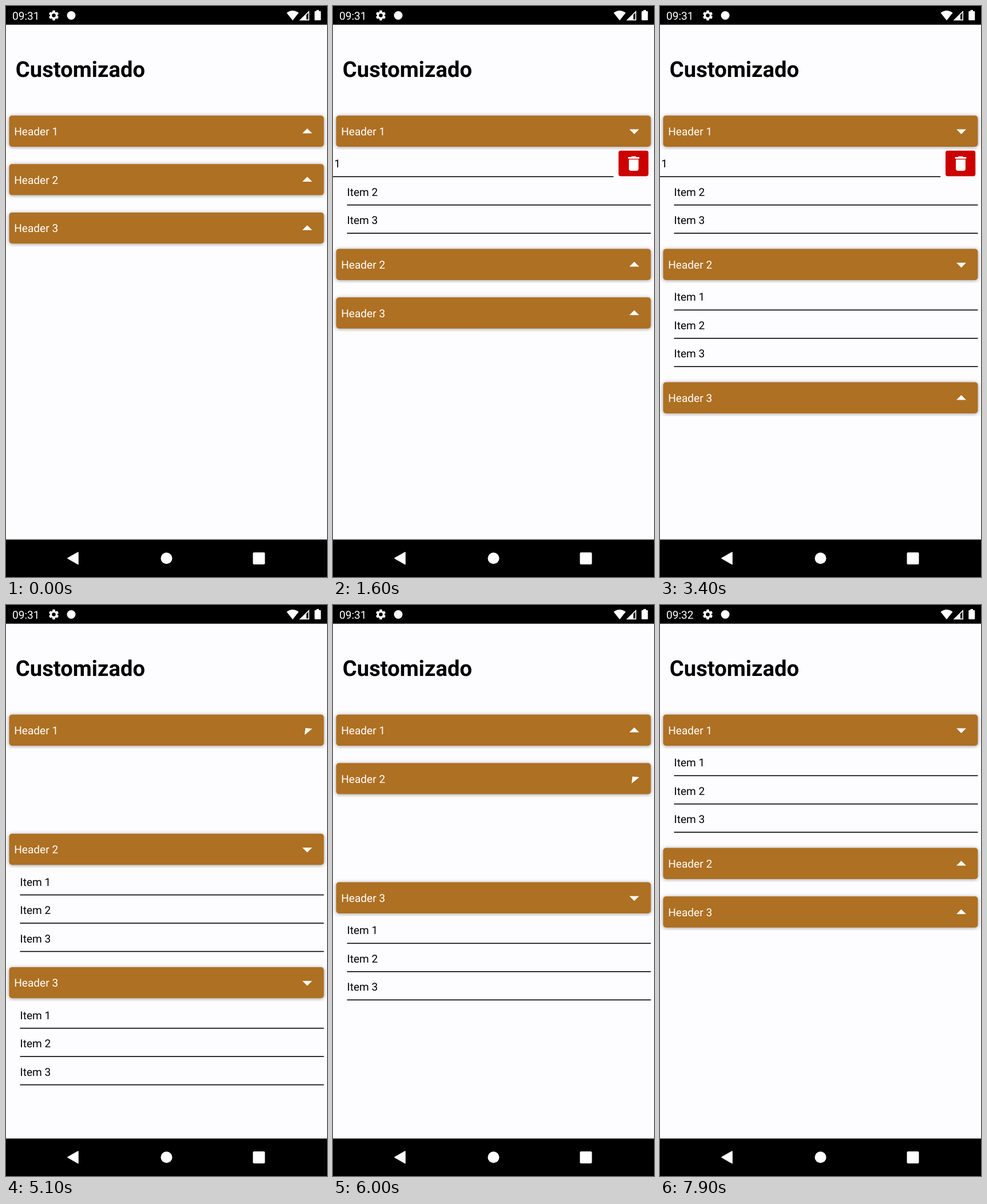
Recreate the animation shown at these times as an HTML page. Size 561 by 998 pixels, loop 8000 ms.

```html
<!DOCTYPE html>
<html lang="pt">
<head>
<meta charset="utf-8">
<title>Customizado</title>
<style>
  html, body { margin: 0; width: 100%; height: 100%; overflow: hidden; background: #fdfcff; }
  svg { display: block; width: 561px; height: 998px; font: 19.1px Roboto, sans-serif; text-rendering: geometricPrecision; }
  .title { font-size: 38.2px; font-weight: 700; }
  .bar { fill: #ae7022; filter: drop-shadow(0 1.5px 3.5px rgba(0, 0, 0, .36)); }
  .row { fill: #fdfcff; }
  .white { fill: #fff; }
</style>
</head>
<body>
<svg viewBox="0 0 561 998">
  <defs>
    <clipPath id="shade"><rect y="-10" width="561" height="69.5"/></clipPath>
  </defs>
  <rect width="561" height="998" fill="#fdfcff"/>
  <text class="title" x="16.8" y="123.7">Customizado</text>
  <g id="list"></g>

  <g class="white">
    <rect width="561" height="32.7" fill="#000"/>
    <text id="clock" x="11" y="23.8">09:31</text>
    <path transform="translate(72.7 5.7) scale(.9)" d="M19.14 12.94c.04-.3.06-.61.06-.94s-.02-.64-.07-.94l2.03-1.58c.18-.14.23-.41.12-.61l-1.92-3.32c-.12-.22-.37-.29-.59-.22l-2.39.96c-.5-.38-1.03-.7-1.62-.94l-.36-2.54c-.04-.24-.24-.41-.48-.41h-3.84c-.24 0-.43.17-.47.41l-.36 2.54c-.59.24-1.13.57-1.62.94l-2.39-.96c-.22-.08-.47 0-.59.22L2.74 8.87c-.12.21-.08.47.12.61l2.03 1.58c-.05.3-.09.63-.09.94s.02.64.07.94l-2.03 1.58c-.18.14-.23.41-.12.61l1.92 3.32c.12.22.37.29.59.22l2.39-.96c.5.38 1.03.7 1.62.94l.36 2.54c.05.24.24.41.48.41h3.84c.24 0 .44-.17.47-.41l.36-2.54c.59-.24 1.13-.56 1.62-.94l2.39.96c.22.08.47 0 .59-.22l1.92-3.32c.12-.22.07-.47-.12-.61zM12 15.6a3.6 3.6 0 1 1 0-7.2 3.6 3.6 0 0 1 0 7.2z"/>
    <circle cx="114" cy="16.5" r="7.5"/>
    <path d="M501 25.3 490.5 11.9Q501 4 511.5 11.9Z"/>
    <path d="M512.5 25.3 530 8V25.3ZM525 15.3V23.6H528.4V12Z" fill-rule="evenodd"/>
    <path d="M542.5 7h4.5v2h2q1.3 0 1.3 1.3v13.4q0 1.3-1.3 1.3h-8.4q-1.3 0-1.3-1.3V10.3q0-1.3 1.3-1.3h1.9Z"/>

    <rect y="932.5" width="561" height="66" fill="#000"/>
    <path d="M108 965.3 126 955V975.6Z" stroke="#fff" stroke-width="1.6" stroke-linejoin="round"/>
    <circle cx="280.5" cy="965.3" r="10"/>
    <rect x="431.5" y="955" width="21" height="21" rx="2"/>
  </g>
</svg>
<script>
const LOOP = 8000, TOP = 191.5, PITCH = 84.7, ROW = 49.45, BODY = 3 * ROW;
const ARROW_MS = 300, LAYOUT_MS = 400, LAYOUT_DELAY = 101;
const SWIPE = { from: 1250, to: 1580, reset: 4893, dist: 65.3 };
const CLOCK_TICK = 7300;
// [time, section, opens]
const TAPS = [
  [800, 0, 1], [1960, 1, 1], [3393, 2, 1],
  [4893, 0, 0], [5793, 1, 0], [6270, 2, 0], [7120, 0, 1]
];

const list = document.getElementById('list');
const clock = document.getElementById('clock');

const itemRow = (n, i) => {
  const y = 59.5 + i * ROW;
  return `<g class="item">
    <rect class="row" x="24" y="${y}" width="531" height="48"/>
    <text x="24.5" y="${y + 31.3}">Item ${n}</text>
    <rect x="24.5" y="${y + 46.5}" width="531" height="1.6"/></g>`;
};

const bin = `<g class="bin"><rect x="499" y="61.3" width="52.3" height="44.6" rx="4" fill="#c00"/>
  <path class="white" transform="translate(508.7 67) scale(1.4)"
    d="M6 19c0 1.1.9 2 2 2h8c1.1 0 2-.9 2-2V7H6v12zM19 4h-3.5l-1-1h-5l-1 1H5v2h14V4z"/></g>`;

const sections = [0, 1, 2].map(i => {
  list.insertAdjacentHTML('beforeend', `<g>
    <clipPath id="body${i}"><rect y="59.5" width="561" height="0"/></clipPath>
    <g class="items" clip-path="url(#body${i})">${i ? '' : bin}${[1, 2, 3].map(itemRow).join('')}</g>
    <g clip-path="url(#shade)"><rect class="bar" x="5.5" width="550" height="54.4" rx="5"/></g>
    <text class="white" x="14.2" y="34.5">Header ${i + 1}</text>
    <path class="arrow white" d="M-8.5 3.4H8.5L0-5.1Z"/></g>`);
  const el = list.lastElementChild, pick = s => el.querySelector(s);
  return { el, items: pick('.items'), clip: pick('clipPath rect'), arrow: pick('.arrow') };
});
const swiped = list.querySelector('.item'), binEl = list.querySelector('.bin');

const ease = (t, start, ms) => {
  const k = Math.min(1, Math.max(0, (t - start) / ms));
  return (1 - Math.cos(Math.PI * k)) / 2;
};

function state(t, section) {
  const s = { turn: 0, open: 0, shown: false };
  for (const [at, id, opens] of TAPS) {
    if (id !== section || t < at) continue;
    const side = k => opens ? k : 1 - k;
    s.turn = side(ease(t, at, ARROW_MS));
    s.open = side(ease(t, at + LAYOUT_DELAY, LAYOUT_MS));
    s.shown = !!opens;
  }
  return s;
}

function draw(t) {
  let y = TOP;
  sections.forEach((sec, i) => {
    const { turn, open, shown } = state(t, i);
    sec.el.setAttribute('transform', `translate(0 ${y})`);
    sec.arrow.setAttribute('transform', `translate(526.5 27.5) rotate(${-180 * turn})`);
    sec.items.setAttribute('opacity', shown ? open : 0);
    sec.clip.setAttribute('height', BODY * open);
    y += PITCH + BODY * open;
  });
  const pull = t < SWIPE.reset ? ease(t, SWIPE.from, SWIPE.to - SWIPE.from) : 0;
  swiped.setAttribute('transform', `translate(${-SWIPE.dist * pull} 0)`);
  binEl.setAttribute('visibility', pull ? 'visible' : 'hidden');
  clock.textContent = t < CLOCK_TICK ? '09:31' : '09:32';
}

const start = performance.now();
function tick() {
  draw((performance.now() - start) % LOOP);
  requestAnimationFrame(tick);
}
tick();
</script>
</body>
</html>
```
